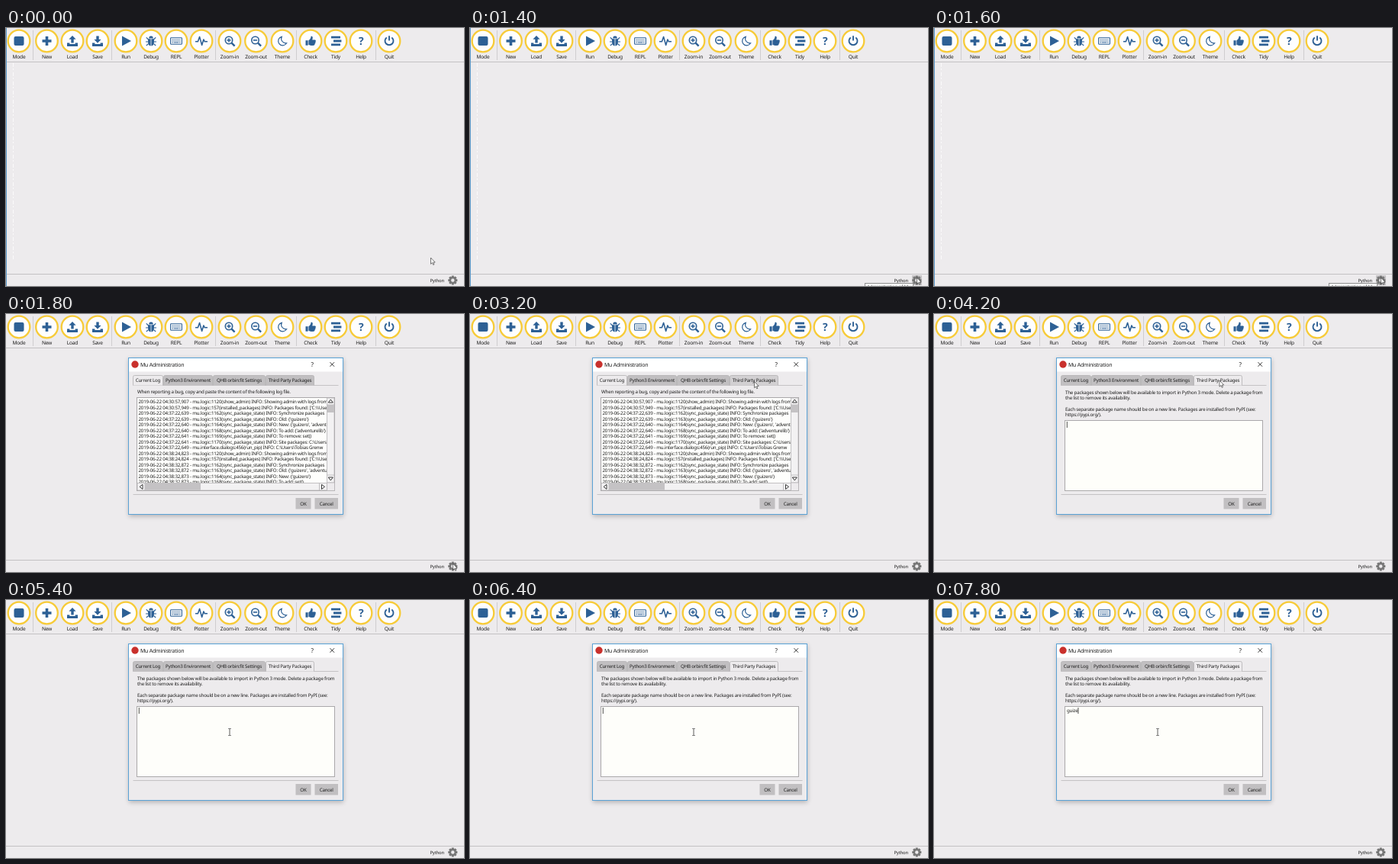
These frames come from a looping animation (600 px wide and 338 px high, 8 s). An HTML page:

```html
<!DOCTYPE html>
<html lang="en">
<head>
<meta charset="utf-8">
<title>Package settings demo</title>
<style>
  html, body { margin: 0; width: 100%; height: 100%; overflow: hidden; background: #edebed; }
  svg { display: block; width: 600px; height: 338px; font-family: "Noto Sans", "Open Sans", sans-serif; }
  text { fill: #1c1c1c; font-size: 6.2px; letter-spacing: -.033em; white-space: pre; text-rendering: geometricPrecision; }
  .label { font-size: 6.6px; text-anchor: middle; }
  .mid { text-anchor: middle; }
  .icon { fill: #2d6095; stroke: none; }
  .icon .line { fill: none; stroke: #2d6095; stroke-width: 1.6; }
</style>
</head>
<body>
<svg id="stage" viewBox="0 0 600 338" xmlns="http://www.w3.org/2000/svg">
  <defs>
    <clipPath id="logClip"><rect x="172" y="110" width="248" height="111"/></clipPath>
    <filter id="blur" x="-10%" y="-10%" width="120%" height="120%"><feGaussianBlur stdDeviation="3"/></filter>
  </defs>
  <rect width="600" height="338" fill="#edebed"/>
  <path d="M0 44.5H600M0 322.5H600" stroke="#c3c1c3"/>
  <path d="M35.5 3V42M138.5 3V42M274.5 3V42M380.5 3V42M484.5 3V42" stroke="#cfcdcf"/>
  <path id="edge" d="M.5 0V338" stroke="#5d9bcb"/>
  <path id="margin" d="M9.5 46V305" stroke="#fff" stroke-dasharray="5 2 2 3" opacity=".75"/>
  <g id="tools"></g>
  <text x="555.5" y="332.9" style="font-size:5.9px">Python</text>
  <rect id="hover" x="579" y="324" width="13" height="13" fill="#c6c4c6"/>
  <g id="gear" transform="translate(585.3 330.5)"></g>
  <g id="tip">
    <rect x="517.5" y="334.5" width="63" height="12" fill="#fff" stroke="#8c8c8c"/>
    <text x="520" y="341" style="fill:#666">Administration of Mu</text>
  </g>
  <g id="dialog">
    <rect x="161" y="59" width="281" height="206" fill="#000" opacity=".25" filter="url(#blur)"/>
    <rect x="160.5" y="57.5" width="281" height="205" fill="#edebed" stroke="#5aa2d6"/>
    <rect x="161" y="58" width="280" height="17.5" fill="#fff"/>
    <circle cx="169" cy="66" r="4.7" fill="#c9302c"/>
    <text x="176" y="68.6" style="font-size:7px">Mu Administration</text>
    <text x="401" y="69" class="mid" style="font-size:8px">?</text>
    <path d="M424.5 63.2l5.6 5.6m0-5.6l-5.6 5.6" stroke="#222" stroke-width=".9"/>
    <path d="M166.5 93.5H435.5M166.5 236.5H435.5" stroke="#c5c3c5"/>
    <g id="tabs"></g>
    <g id="logPage">
      <text x="172" y="104.2">When reporting a bug, copy and paste the content of the following log file.</text>
      <rect x="171.5" y="109.5" width="259" height="122" fill="#fefefc" stroke="#aaa8aa"/>
      <g id="log" clip-path="url(#logClip)"></g>
      <g stroke="#b5b3b5" stroke-width=".8">
        <path d="M420.5 110H430V221H420.5zM172 221.5H420.5V231H172z" fill="#f3f2f3"/>
        <path d="M420.5 221H430.5V231.5H420.5z" fill="#edebed"/>
        <path d="M420.5 119H430M420.5 211H430M182 221.5V231M410.5 221.5V231" fill="none"/>
      </g>
      <path d="M420.5 119h9.5v10h-9.5zM182 221.8h73v9h-73z" fill="#c4c2c4"/>
      <g fill="#fff" stroke="#222" stroke-width=".9">
        <path d="M422.3 116l3-4 3 4zM422.3 214l3 4 3-4zM179 223.4l-4 3 4 3zM413.5 223.4l4 3-4 3z"/>
      </g>
    </g>
    <g id="packPage">
      <text x="172" y="104.5">The packages shown below will be available to import in Python 3 mode. Delete a package from</text>
      <text x="172" y="112">the list to remove its availability.</text>
      <text x="172" y="126.9">Each separate package name should be on a new line. Packages are installed from PyPI (see:</text>
      <text x="172" y="134.4">https://pypi.org/).</text>
      <rect x="171.5" y="139.5" width="259" height="92" fill="#fefefa" stroke="#aaa8aa"/>
      <text id="typed" x="174" y="147.4"></text>
      <path id="caret" d="M0 141V149" stroke="#222" stroke-width=".8"/>
    </g>
    <rect x="379.5" y="241" width="20" height="14.5" fill="#c1bfc1"/>
    <rect x="404.5" y="241" width="30.5" height="14.5" fill="#c1bfc1"/>
    <text x="389.5" y="250.6" class="mid">OK</text>
    <text x="419.7" y="250.6" class="mid">Cancel</text>
  </g>
  <path id="arrow" d="M0 0V8.2L1.9 6.5 3.2 9.3 4.4 8.8 3.2 6H5.7z" fill="#fff" stroke="#222" stroke-width=".6"/>
  <path id="beam" d="M-1.7 -4.5H-.5L0 -4 .5 -4.5H1.7M0 -4V4M-1.7 4.5H-.5L0 4 .5 4.5H1.7" fill="none" stroke="#333" stroke-width=".8"/>
</svg>
<script>
const $ = id => document.getElementById(id);
const show = (id, on) => { $(id).style.display = on ? '' : 'none'; };

const tray = '<path d="M-7 2.6H-3.6V4H3.6V2.6H7V7H-7z"/>';
const lens = sign => `<circle class="line" cx="-1" cy="-1" r="4.7"/>
  <path class="line" d="M2.6 2.6L6.6 6.6" style="stroke-width:2.4"/><path class="line" d="${sign}"/>`;
const keys = [-2, 0, 2].map(y =>
  `<path class="line" d="M-5.5 ${y}H5.5" style="stroke-width:1.1" stroke-dasharray="${y < 2 ? '1.2 .8' : '1.4 .8 6.6 .8'}"/>`).join('');

// name, centre x, artwork around the centre
const tools = [
  ['Mode', 17, '<rect x="-6.5" y="-6" width="13" height="12" rx="2"/>'],
  ['New', 53.5, '<path d="M-1.8-6H1.8V-1.8H6V1.8H1.8V6H-1.8V1.8H-6V-1.8H-1.8z"/>'],
  ['Load', 87, tray + '<path d="M0-7L4.6-2.2H1.7V2.6H-1.7V-2.2H-4.6z"/>'],
  ['Save', 120, tray + '<path d="M0 2.8L4.6-2H1.7V-6.6H-1.7V-2H-4.6z"/>'],
  ['Run', 157, '<path d="M-5-6.5L7 0-5 6.5z"/>'],
  ['Debug', 190, `<path d="M-2.8-3.6a2.8 2.9 0 0 1 5.6 0zM-4-2.8H-.4V6.6C-3 6.4-4 4-4 1zM4-2.8H.4V6.6C3 6.4 4 4 4 1z"/>
    <path class="line" d="M-6.2-4.6L-3.6-2M6.2-4.6L3.6-2M-7 1H-4M7 1H4M-6.2 6L-3.4 3.6M6.2 6L3.4 3.6" style="stroke-width:1.2"/>`],
  ['REPL', 223, '<rect class="line" x="-7.4" y="-4.3" width="14.8" height="8.6" rx=".8" style="stroke-width:1.1"/>' + keys],
  ['Plotter', 256, '<path class="line" d="M-8 .8H-4.6L-2.4-5.4.6 5.4 2.9-2 4.3.8H8" stroke-linejoin="round"/>'],
  ['Zoom-in', 293, lens('M-3.6-1H1.6M-1-3.6V1.6')],
  ['Zoom-out', 327.5, lens('M-3.6-1H1.6')],
  ['Theme', 362, '<path class="line" d="M-.8-5.6A5.8 5.8 0 1 0 5.6 2.8 6 6 0 0 1-.8-5.6z" style="stroke-width:1.2"/>'],
  ['Check', 399, '<path d="M-6.5-.8H-3.4V5.8H-6.5zM-2.6-.8C-.6-2 .4-3.6.6-6.2 3.2-6.6 3.2-3.6 2.2-1.6H6C7.4-1 6.8.8 6.4 1.2 6.6 2.6 6.2 3.2 5.6 3.6 5.6 5.6 4.6 6 3 6-.2 6-1 5.4-2.6 5z"/>'],
  ['Tidy', 432, '<path d="M-6-6.2H6V-3.4H-6zM-3-1.4H7.4V1.4H-3zM-6 3.4H6V6.2H-6z"/>'],
  ['Help', 465, '<text class="mid" y="5" style="font-size:14px;font-weight:800;fill:#2d6095">?</text>'],
  ['Quit', 502, '<path class="line" d="M-3.3-4.6A5.5 5.5 0 1 0 3.3-4.6M0-6.8V-.4" style="stroke-width:1.9"/>']
];
$('tools').innerHTML = tools.map(([name, x, art]) => `
  <circle cx="${x}" cy="17" r="14.3" fill="#fefefe" stroke="#f7cb38" stroke-width="2.3"/>
  <g class="icon" transform="translate(${x} 17)">${art}</g>
  <text class="label" x="${x}" y="40.4">${name}</text>`).join('');

$('gear').innerHTML = [0, 45, 90, 135].map(a =>
  `<rect x="-1.5" y="-6" width="3" height="12" fill="#777" transform="rotate(${a})"/>`).join('') +
  '<circle r="3.5" fill="none" stroke="#777" stroke-width="2.4"/><circle r="2.2" fill="#edebed"/>';

const tabs = [['Current Log', 166, 206], ['Python3 Environment', 206, 271],
  ['QHB orbin:fit Settings', 271, 340], ['Third Party Packages', 340, 404]];
$('tabs').innerHTML = tabs.map(([name, a, b]) => `
  <path class="tab" d="M${a + .5} 93.5V82.5q0-2 2-2H${b - 2.5}q2 0 2 2V93.5" stroke="#b3b1b3" stroke-width=".8"/>
  <text class="mid" x="${(a + b) / 2}" y="89.1">${name}</text>`).join('');
const tabShapes = [...document.querySelectorAll('.tab')];

const sync = n => `mu.logic:${n}(sync_package_state)`;
const admin = 'mu.logic:1120(show_admin)', found = 'mu.logic:157(installed_packages)';
const log = [
  ['30:57,907', admin, 'Showing admin with logs from'],
  ['30:57,949', found, "Packages found: ['C:\\\\Users"],
  ['37:22,639', sync(1162), 'Synchronize packages'],
  ['37:22,639', sync(1163), "Old: {'guizero'}"],
  ['37:22,640', sync(1164), "New: {'guizero', 'adventurelib'}"],
  ['37:22,640', sync(1168), "To add: {'adventurelib'}"],
  ['37:22,641', sync(1169), 'To remove: set()'],
  ['37:22,641', sync(1170), 'Site packages: C:\\Users'],
  ['37:22,649', 'mu.interface.dialogs:456(run_pip)', 'C:\\Users\\Tobias Grenw'],
  ['38:24,823', admin, 'Showing admin with logs from'],
  ['38:24,824', found, "Packages found: ['C:\\\\Users"],
  ['38:32,872', sync(1162), 'Synchronize packages'],
  ['38:32,872', sync(1163), "Old: {'guizero', 'adventurelib'}"],
  ['38:32,873', sync(1164), "New: {'guizero'}"],
  ['38:32,873', sync(1168), 'To add: set()']
];
$('log').innerHTML = log.map(([time, where, note], i) =>
  `<text x="173.5" y="${117.3 + i * 7.5}">2019-06-22 04:${time} - ${where} INFO: ${note}</text>`).join('');

// time, x, y of the pointer
const path = [[0, 556.5, 301], [800, 585.5, 327], [2400, 585.5, 327], [3200, 372.5, 88.5],
  [3600, 374, 87], [4600, 374, 87], [5400, 293, 173], [8000, 293, 173]];
const LOOP = 8000, STEP = 200, OPEN = 1800, SWITCH = 4200, TYPE = 7000, BLINK = 530;

function pointer(t) {
  const i = path.findIndex(p => p[0] > t);
  const [t0, x0, y0] = path[i - 1], [t1, x1, y1] = path[i];
  const u = (t - t0) / (t1 - t0), e = u * u * (3 - 2 * u);
  return [x0 + (x1 - x0) * e, y0 + (y1 - y0) * e];
}

function paintTabs(active, x, y) {
  tabs.forEach(([, a, b], i) => {
    const over = x > a && x < b && y > 80 && y < 93;
    tabShapes[i].setAttribute('fill', i === active ? '#edebed' : over ? '#d2d0d2' : '#c1bfc1');
  });
}

function draw(now) {
  const t = Math.floor(now % LOOP / STEP) * STEP;
  const open = t >= OPEN, packs = t >= SWITCH;
  const [x, y] = pointer(t);
  const beam = packs && y > 139;

  show('edge', !open);
  show('margin', !open);
  show('dialog', open);
  show('hover', t >= 800 && !open);
  show('tip', t >= 1400 && !open);
  show('logPage', !packs);
  show('packPage', packs);
  paintTabs(packs ? 3 : 0, x, y);

  const word = 'guize'.slice(0, Math.max(0, (t - TYPE) / STEP + 1));
  $('typed').textContent = word;
  const width = packs && word ? $('typed').getComputedTextLength() : 0;
  $('caret').setAttribute('transform', `translate(${174.3 + width} 0)`);
  show('caret', word || Math.floor((t - SWITCH) / BLINK) % 2 === 0);

  show('arrow', !beam);
  show('beam', beam);
  $(beam ? 'beam' : 'arrow').setAttribute('transform', `translate(${x} ${y})`);
}

function tick() {
  draw(performance.now());
  requestAnimationFrame(tick);
}
tick();
</script>
</body>
</html>
```
